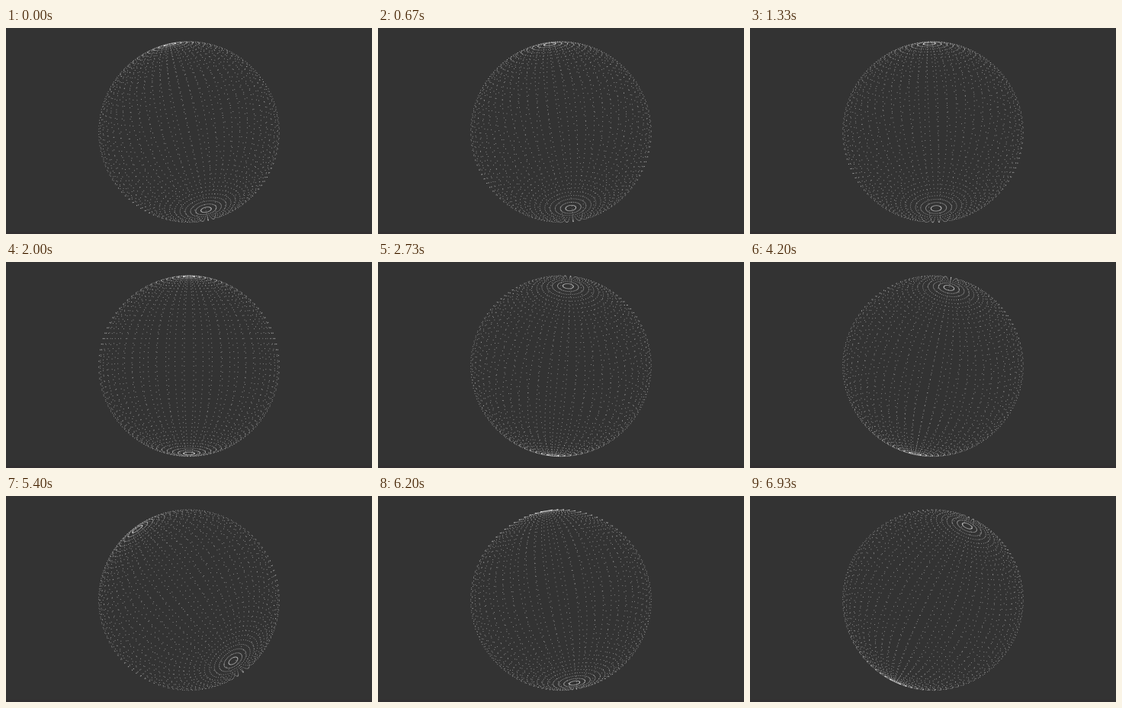
An HTML page with a canvas that plays this animation: 480 px wide and 270 px high, repeating every 6.99 s.

```html
<!DOCTYPE html>
<html lang="en">
<head>
<meta charset="utf-8">
<title>Dotted sphere</title>
<style>
  html, body { margin: 0; width: 100%; height: 100%; overflow: hidden; background: #333; }
  canvas { display: block; width: 480px; height: 270px; }
</style>
</head>
<body>
<canvas id="stage" width="480" height="270"></canvas>
<script>
const ctx = document.getElementById('stage').getContext('2d');
const LOOP = 6990, STEP = 66.6;
const CX = 240, CY = 136.3, FOCAL = 609, DIST = 5.235;
const COLS = 50, ROWS = 50, DOT = 0.9;
const RAD = Math.PI / 180;

// time in ms, tilt towards the viewer, roll to the right (degrees)
const poses = [
  [0, 18.4, -11.8],
  [1330, 22.4, -2.2],
  [2000, 3.4, 0],
  [3400, -30.7, 9.1],
  [4200, -18, 10.9],
  [5400, 28.7, -32.5],
  [6930, -16.5, 24]
];

const points = [];
for (let r = 1; r < ROWS; r++) {
  const theta = Math.PI * r / ROWS;
  for (let c = 0; c < COLS; c++) {
    const phi = 2 * Math.PI * c / COLS;
    points.push([Math.sin(theta) * Math.cos(phi), -Math.cos(theta), Math.sin(theta) * Math.sin(phi)]);
  }
}

function slope(i, k) {
  const a = poses[Math.max(i - 1, 0)], b = poses[Math.min(i + 1, poses.length - 1)];
  return (b[k] - a[k]) / (b[0] - a[0]);
}

// smooth cubic curve through the poses
function angle(t, k) {
  let i = 0;
  while (i < poses.length - 2 && t > poses[i + 1][0]) i++;
  const a = poses[i], b = poses[i + 1], d = b[0] - a[0];
  const u = Math.min((t - a[0]) / d, 1), v = 1 - u;
  return RAD * (v * v * (1 + 2 * u) * a[k] + u * u * (3 - 2 * u) * b[k]
    + d * u * v * (v * slope(i, k) - u * slope(i + 1, k)));
}

function draw(t) {
  const tilt = angle(t, 1), roll = angle(t, 2);
  const ct = Math.cos(tilt), st = Math.sin(tilt);
  const cr = Math.cos(roll), sr = Math.sin(roll);

  ctx.fillStyle = '#333';
  ctx.fillRect(0, 0, 480, 270);
  ctx.fillStyle = '#322f31';
  ctx.fillRect(0, 267, 480, 3);

  ctx.fillStyle = 'rgba(255,255,255,.5)';
  for (const [x, y, z] of points) {
    const px = x * cr - y * sr, ry = x * sr + y * cr;
    const py = ry * ct + z * st, pz = z * ct - ry * st;
    const scale = FOCAL / (DIST - pz);
    ctx.fillRect(CX + px * scale - DOT / 2, CY + py * scale - DOT / 2, DOT, DOT);
  }
}

const start = performance.now();
function tick() {
  const t = (performance.now() - start) % LOOP;
  draw(Math.floor((t + 5) / STEP) * STEP);
  requestAnimationFrame(tick);
}
tick();
</script>
</body>
</html>
```
